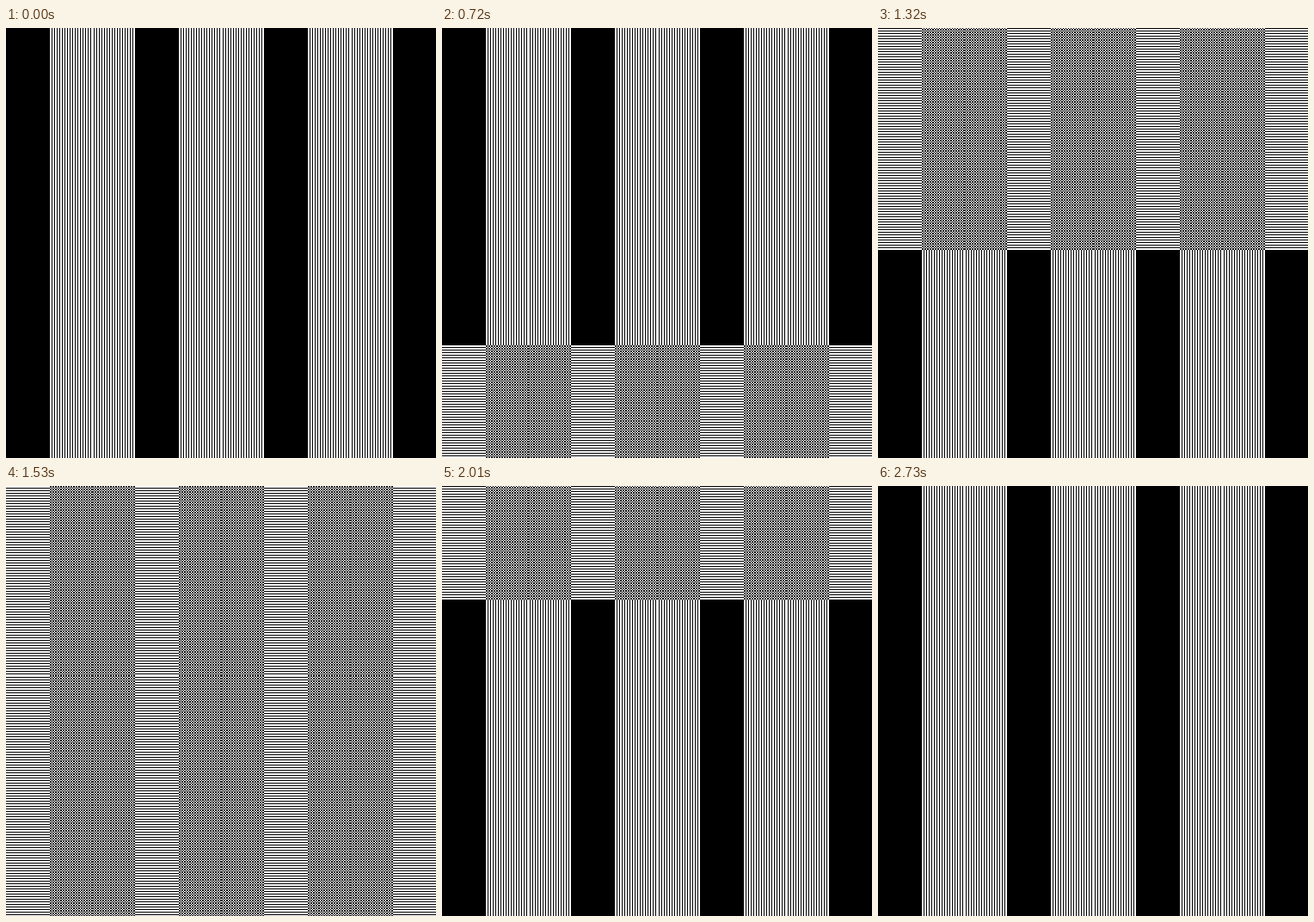
An HTML page with a canvas that plays this animation: 500x500 px, repeating every 2760 ms.

```html
<!DOCTYPE html>
<html lang="en">
<head>
<meta charset="utf-8">
<title>Moire gratings</title>
<style>
  html, body { margin: 0; width: 100%; height: 100%; overflow: hidden; background: #000; }
  canvas { display: block; width: 500px; height: 500px; image-rendering: pixelated; }
</style>
</head>
<body>
<canvas id="stage" width="500" height="500"></canvas>
<script>
const SIZE = 500, STEP = 30, STEPS = 92, PITCH = 3;
const ctx = document.getElementById('stage').getContext('2d');
const image = ctx.createImageData(SIZE, SIZE);
const pixels = new Uint32Array(image.data.buffer);
const BLACK = 0xff000000, WHITE = 0xffffffff;

// Square wave with a pitch of three pixels, centred on pixel 1
function grating(pos) {
  const d = (((pos - 1) % PITCH) + PITCH) % PITCH;
  return Math.min(d, PITCH - d) < PITCH / 4 ? 1 : 0;
}

// A fixed grating crossed with a copy that shift(i) moves backwards
function beat(shift) {
  return Uint8Array.from({ length: SIZE }, (_, i) => grating(i) ^ grating(i + shift(i)));
}

const columns = beat(x => Math.floor(x / 50));

function draw(step) {
  const t = step / (STEPS - 1);
  const drift = Math.round(46 * t) / 2;
  const rows = beat(y => drift + Math.floor(y / SIZE + t));
  for (let y = 0, i = 0; y < SIZE; y++) {
    for (let x = 0; x < SIZE; x++) {
      pixels[i++] = columns[x] ^ rows[y] ? WHITE : BLACK;
    }
  }
  ctx.putImageData(image, 0, 0);
}

const start = performance.now();
let shown = -1;

function tick() {
  const step = Math.floor((performance.now() - start) / STEP) % STEPS;
  if (step !== shown) draw(shown = step);
  requestAnimationFrame(tick);
}
tick();
</script>
</body>
</html>
```
